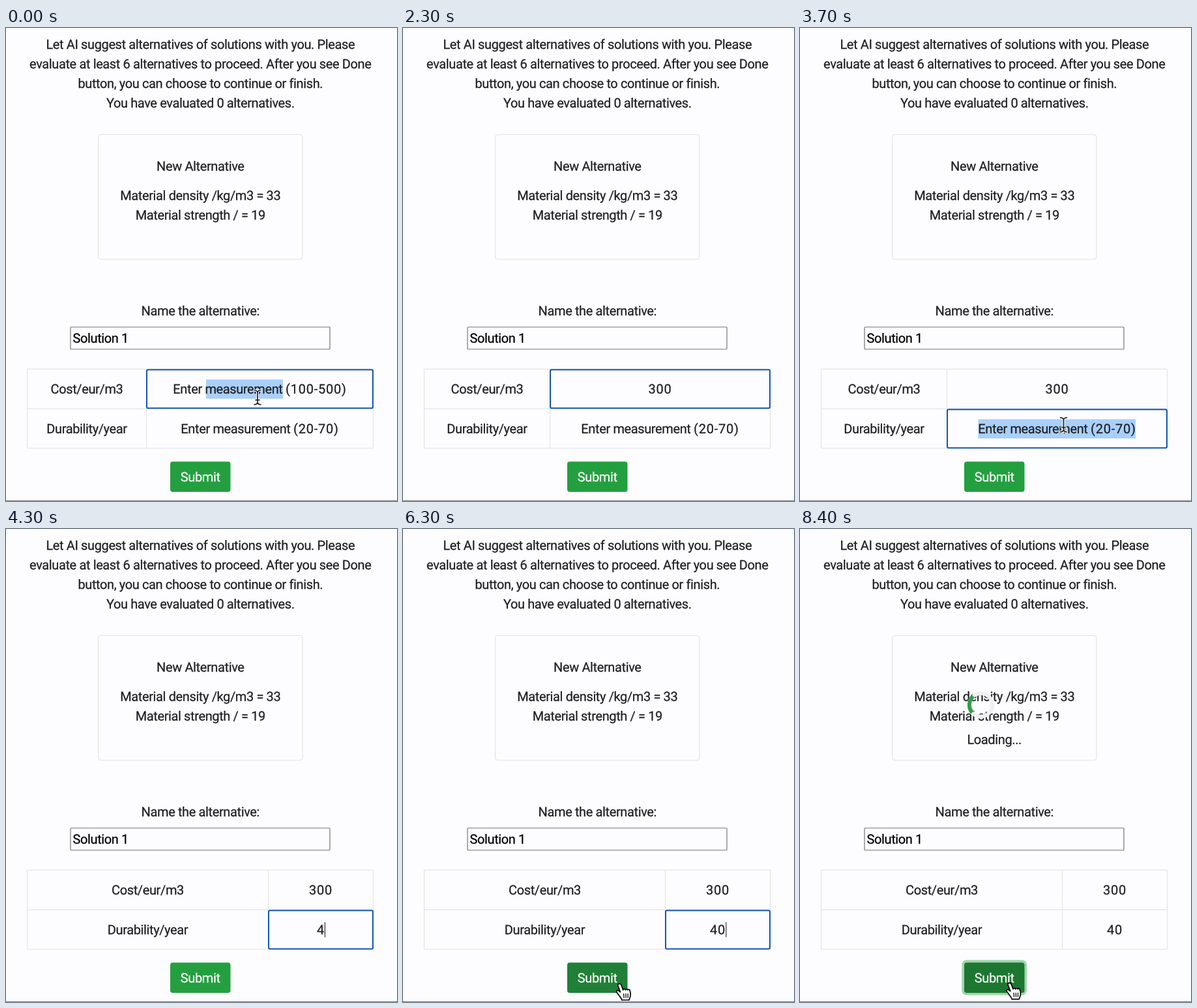
Write an HTML page that moves like this. It is 600 by 726 pixels and loops after 8.5 s.

```html
<!DOCTYPE html>
<html lang="en">
<head>
<meta charset="utf-8">
<title>Evaluate alternatives</title>
<style>
html, body { margin: 0; width: 100%; height: 100%; overflow: hidden; background: #fdfcfe; }
svg { display: block; width: 600px; height: 726px; }
text { font: 20px Roboto, "Liberation Sans", sans-serif; letter-spacing: -.38px; fill: #1d1f22; stroke: #1d1f22; stroke-width: .25px; text-anchor: middle; text-rendering: geometricPrecision; }
.num { letter-spacing: .75px; }
.line { fill: none; stroke: #dee2e6; }
.sel { fill: #a9d0fb; }
.ring { fill: none; stroke: #1656ac; stroke-width: 2; }
.cursor { stroke-linejoin: round; stroke-linecap: round; }
</style>
</head>
<body>
<svg viewBox="0 0 600 726">
  <rect width="600" height="726" fill="#fdfcfe"/>
  <g id="copy"></g>
  <rect class="line" x="141.5" y="163.5" width="313.5" height="191.5" rx="4"/>

  <rect x="99" y="459" width="398" height="34" rx="1" fill="none" stroke="#767676" stroke-width="1.2"/>
  <text x="102.5" y="483.3" style="text-anchor:start;fill:#000;stroke:#000">Solution 1</text>

  <path class="line" d="M32.5 523.5H563.5V645H32.5ZM32.5 584.5H563.5"/>
  <path id="divider" class="line"/>
  <rect id="sel" class="sel"/>
  <text id="label0" y="561.2">Cost/eur/m3</text>
  <text id="label1" y="622.2">Durability/year</text>
  <text id="value0" y="561.2"></text>
  <text id="value1" y="622.2"></text>
  <rect id="ring" class="ring" height="59" rx="2"/>
  <path id="caret" stroke="#111"/>

  <rect id="halo" x="248.3" y="661.5" width="99.7" height="54" rx="7" fill="#a0d6ad"/>
  <rect id="button" x="252" y="665.5" width="92.5" height="46.5" rx="4"/>
  <text x="298.2" y="696.2" style="fill:#fff;stroke:#fff">Submit</text>

  <g id="loading">
    <circle cx="277.5" cy="270" r="17.7" fill="none" stroke="#f0f0f1" stroke-width="6"/>
    <path id="arc" d="M-12.5 -12.5A17.7 17.7 0 0 1 12.5 -12.5" fill="none" stroke="#359c4b" stroke-width="6"/>
    <text x="298.2" y="330">Loading...</text>
  </g>
  <path d="M0 725.5H600" stroke="#7c7c7c"/>

  <g id="beam" class="cursor" fill="none">
    <path id="beamHalo" stroke="#fff" stroke-width="3.6"/>
    <path id="beamLine" stroke="#111" stroke-width="1.6"/>
  </g>
  <path id="arrow" class="cursor" d="M0 0V18L4.2 14 7 20.5 10 19.2 7.3 13H13Z" fill="#000" stroke="#fff" stroke-width="1.3"/>
  <g id="hand" class="cursor">
    <g transform="scale(1.06)">
      <path d="M0 0c-2 0-2.6 1.6-2 3l3.4 9-2.8-2c-1.6-1-3.6.8-2.4 2.4l5.4 7.2c1 1.6 2 2.6 2 4h10.6c.2-2.4 2-4.4 2-7.6 0-2.6-.6-5.6-1.4-7.2-.6-1.2-2.4-1-2.6.4-.2-1.6-3-2-3.4-.2-.4-1.6-3.2-1.8-3.4 0l-2.8-7.4c-.5-1-1.2-1.6-2.6-1.6z" fill="#fff" stroke="#000" stroke-width="1.6"/>
      <path d="M6.3 14.5l.4 5.5M9.4 14.5l.2 5.5M12.4 14.5v5.5" stroke="#000" stroke-width="1.2"/>
    </g>
  </g>
</svg>
<script>
const LOOP = 8500, STEP = 100;
const LEFT = 32.5, RIGHT = 563.5, ROW = [523.5, 584.5];
const $ = id => document.getElementById(id);
const set = (id, attrs) => {
  for (const k in attrs) $(id).setAttribute(k, attrs[k]);
};
const show = (id, on) => set(id, { visibility: on ? "visible" : "hidden" });
const within = (t, a, b) => t >= a && t < b;
const num = s => `<tspan class="num">${s}</tspan>`;
const prompt = range => "Enter measurement " + num(range);

// Last entry whose start time has passed.
const at = (keys, t) => keys.reduce((v, k) => t >= k[0] ? k[1] : v, keys[0][1]);

const COPY = [
  [32.4, "Let AI suggest alternatives of solutions with you. Please"],
  [62.4, "evaluate at least 6 alternatives to proceed. After you see Done"],
  [92.4, "button, you can choose to continue or finish."],
  [122.2, "You have evaluated 0 alternatives."],
  [219, "New Alternative"],
  [264, "Material density /kg/m3 = 33"],
  [294, "Material strength / = 19"],
  [441.2, "Name the alternative:"]
];
$("copy").innerHTML = COPY.map(([y, s]) => `<text x="298.3" y="${y}">${s}</text>`).join("");

const BEAM = "M-5 -11Q-1 -11 0 -8Q1 -11 5 -11M0 -8V8M-5 11Q-1 11 0 8Q1 11 5 11M-3 4H3";
set("beamHalo", { d: BEAM });
set("beamLine", { d: BEAM });

const COLUMN = [[0, 215.5], [1400, 225.5], [4300, 402.5]];
const VALUES = [
  [[0, prompt("(100-500)")], [1400, num("3")], [1700, num("30")], [1800, num("300")]],
  [[0, prompt("(20-70)")], [4300, num("4")], [5300, num("40")]]
];
const FOCUS = [[0, 0], [2700, 1], [7500, -1]];
// Selected x range in the focused row.
const SELECTION = [[0, [307, 425]], [100, [257.5, 521.5]], [1400, null],
  [3400, [323, 441.5]], [3600, [273.5, 515]], [4300, null]];
const CARET = [[1400, 2300], [4300, 4800], [5300, 5800], [6300, 6800], [7300, 7500]];
// Pointer path: time, x, y.
const POINTER = [[0, 386, 567], [2300, 386, 567], [2700, 404.5, 609], [5600, 404.5, 609],
  [6200, 332, 698], [6800, 332, 698], [7300, 321.3, 696.7], [LOOP, 321.3, 696.7]];
const TYPING = [[1400, 2400], [4300, 5600]];

function pointerAt(t) {
  const i = POINTER.findIndex(p => p[0] > t);
  const [t0, x0, y0] = POINTER[i - 1], [t1, x1, y1] = POINTER[i];
  const u = (t - t0) / (t1 - t0), e = u * u * (3 - 2 * u);
  return [x0 + (x1 - x0) * e, y0 + (y1 - y0) * e];
}

function drawTable(t) {
  const col = at(COLUMN, t), focus = at(FOCUS, t), sel = at(SELECTION, t);
  const mid = (col + RIGHT) / 2;
  set("divider", { d: `M${col} 523.5V645` });
  VALUES.forEach((keys, i) => {
    set("label" + i, { x: (LEFT + col) / 2 });
    set("value" + i, { x: mid });
    const html = at(keys, t), el = $("value" + i);
    if (el.dataset.now !== html) el.innerHTML = el.dataset.now = html;
  });

  show("ring", focus >= 0);
  show("sel", sel);
  show("caret", CARET.some(([a, b]) => within(t, a, b)));
  if (focus < 0) return;
  const top = ROW[focus];
  set("ring", { x: col + .5, y: top + 1, width: RIGHT - col - 1 });
  if (sel) set("sel", { x: sel[0], y: top + 16, width: sel[1] - sel[0], height: 29.5 });
  const digits = $("value" + focus).textContent.length;
  set("caret", { d: `M${mid + 6.4 * digits} ${top + 19}v23` });
}

function drawPointer(t) {
  const [x, y] = pointerAt(t);
  const visible = !TYPING.some(([a, b]) => within(t, a, b));
  const over = within(x, 252, 344.5) && within(y, 665.5, 712);
  const kind = over ? "hand" : y < 645 ? "beam" : "arrow";
  for (const id of ["beam", "arrow", "hand"]) {
    show(id, visible && id === kind);
    set(id, { transform: `translate(${x} ${y})` });
  }
  const clicked = t >= 7500;
  set("button", { fill: clicked ? "#1d7731" : over ? "#208037" : "#249f40" });
  show("halo", clicked);
}

function draw(time) {
  const t = Math.floor(time % LOOP / STEP) * STEP;
  drawTable(t);
  drawPointer(t);
  show("loading", t >= 7700);
  set("arc", { transform: `translate(277.5 270) rotate(${(t - 7640) * .36})` });
}

let start;
function tick(now) {
  start ??= now;
  draw(now - start);
  requestAnimationFrame(tick);
}
draw(0);
requestAnimationFrame(tick);
</script>
</body>
</html>
```
